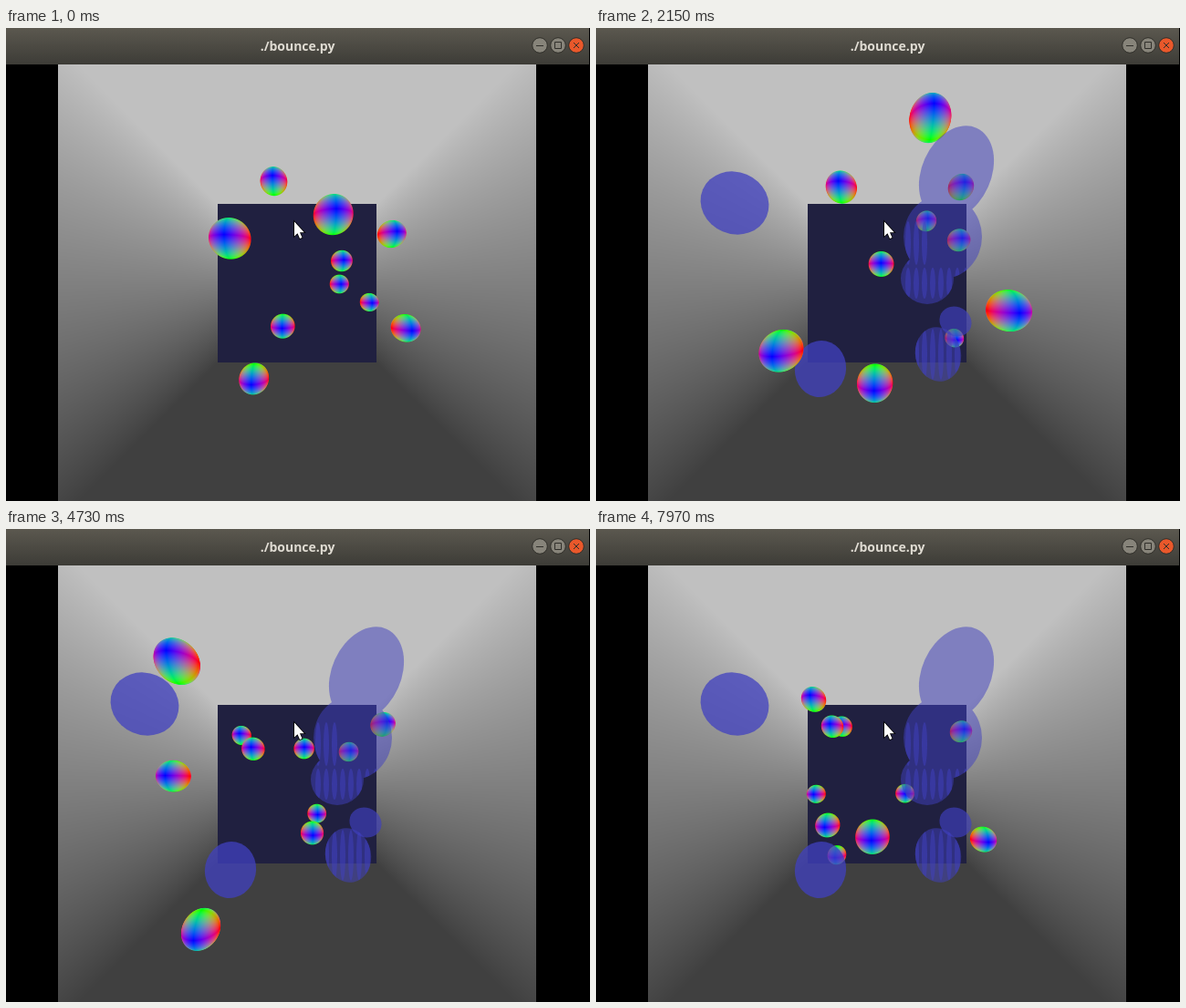
An HTML page with a canvas that plays this animation: 640x519 px, repeating every 8000 ms.

```html
<!DOCTYPE html>
<html lang="en">
<head>
<meta charset="utf-8">
<title>./bounce.py</title>
<style>
html, body { margin: 0; width: 100%; height: 100%; overflow: hidden; background: #000; }
canvas { display: block; }
</style>
</head>
<body>
<canvas id="stage" width="640" height="519"></canvas>
<script>
const LOOP = 8000;
const CX = 319, CY = 280, FOCAL = 262, RADIUS = 0.11;
const ctx = document.getElementById('stage').getContext('2d');

const clamp = (v, lo, hi) => Math.min(hi, Math.max(lo, v));

function makeCanvas(w, h) {
  const canvas = document.createElement('canvas');
  canvas.width = w;
  canvas.height = h;
  return canvas;
}

// ---- Room and window frame, painted once ----

function paintRoom(g) {
  const image = g.createImageData(640, 519);
  for (let y = 0, i = 0; y < 519; y++) {
    for (let x = 0; x < 640; x++, i += 4) {
      const u = Math.abs(x + 0.5 - CX), v = y + 0.5 - CY;
      let rgb = [0, 0, 0];
      if (Math.max(u, Math.abs(v)) < FOCAL / 3) rgb = [32, 32, 64];
      else if (u < FOCAL) rgb.fill(128 - 64 * clamp(v / u, -1, 1));
      image.data.set([...rgb, 255], i);
    }
  }
  g.putImageData(image, 0, 0);
}

function paintButton(g, x, color, glyph) {
  g.beginPath();
  g.arc(x, 19, 8.3, 0, 7);
  g.fillStyle = color;
  g.fill();
  g.strokeStyle = '#302f2a';
  g.lineWidth = 1;
  g.stroke();
  g.beginPath();
  glyph(x);
  g.stroke();
}

function paintTitleBar(g) {
  const shade = g.createLinearGradient(0, 0, 0, 40);
  shade.addColorStop(0, '#5b584f');
  shade.addColorStop(1, '#3d3c37');
  g.fillStyle = shade;
  g.fillRect(0, 0, 639, 40);
  g.fillStyle = '#dfdbd2';
  g.font = 'bold 14px "Open Sans", sans-serif';
  g.textAlign = 'center';
  g.fillText('./bounce.py', 319.5, 25);
  paintButton(g, 585, '#87847a', x => { g.moveTo(x - 4, 19.5); g.lineTo(x + 4, 19.5); });
  paintButton(g, 605, '#87847a', x => g.rect(x - 3.5, 15.5, 7, 7));
  paintButton(g, 625, '#e9582b', x => {
    g.moveTo(x - 3, 16); g.lineTo(x + 3, 22);
    g.moveTo(x + 3, 16); g.lineTo(x - 3, 22);
  });
}

const backdrop = makeCanvas(640, 519);
paintRoom(backdrop.getContext('2d'));
paintTitleBar(backdrop.getContext('2d'));

// ---- Balls: constant velocity, reflected by the walls of the room ----

const WALLS = [[-0.89, 0.89], [-0.89, 0.89], [1.18, 2.89]];
const balls = [];
const ball = (start, velocity) => balls.push({ start, velocity });

ball([-0.19, -0.83, 1.95], [0.386, 0.453, -0.398]);
ball([-0.36, -0.24, 1.29], [-0.508, -0.208, 0.198]);
ball([0.2, -0.38, 1.33], [0.21, -0.218, 0.365]);
ball([0.77, -0.4, 1.95], [-0.252, -0.22, -0.4]);
ball([0.46, -0.23, 2.47], [0.415, -0.208, 0.065]);
ball([0.49, 0.01, 2.78], [0.224, 0.302, 0.045]);
ball([0.87, 0.23, 2.88], [-0.428, -0.184, -0.375]);
ball([-0.13, 0.39, 2.17], [0.388, -0.378, 0.085]);
ball([0.87, 0.36, 1.92], [-0.439, 0.117, -0.21]);
ball([-0.32, 0.71, 1.78], [-0.114, -0.162, -0.23]);

function reflect(v, [lo, hi]) {
  const span = hi - lo, period = 2 * span;
  const u = ((v - lo) % period + period) % period;
  return lo + Math.min(u, period - u);
}

const positionAt = ({ start, velocity }, t) =>
  start.map((s, axis) => reflect(s + velocity[axis] * t / 1000, WALLS[axis]));

const SPRITE = 72;
const sprite = makeCanvas(SPRITE, SPRITE);
const spriteCtx = sprite.getContext('2d');
const pixels = spriteCtx.createImageData(SPRITE, SPRITE);

// Ray-cast sphere, coloured by the absolute value of its surface normal.
function drawBall([X, Y, Z]) {
  const left = Math.round(CX + X * FOCAL / Z) - SPRITE / 2;
  const top = Math.round(CY + Y * FOCAL / Z) - SPRITE / 2;
  const c = X * X + Y * Y + Z * Z - RADIUS * RADIUS;
  const edge = 2 * RADIUS * Z / FOCAL;
  const channel = n => 255 * Math.min(1, Math.abs(n) / RADIUS);
  pixels.data.fill(0);
  for (let py = 0, i = 0; py < SPRITE; py++) {
    for (let px = 0; px < SPRITE; px++, i += 4) {
      const dx = (left + px + 0.5 - CX) / FOCAL, dy = (top + py + 0.5 - CY) / FOCAL;
      const a = dx * dx + dy * dy + 1, b = dx * X + dy * Y + Z;
      const disc = b * b - a * c;
      const alpha = clamp(disc / edge + 0.5, 0, 1);
      if (!alpha) continue;
      const s = (b - Math.sqrt(Math.max(0, disc))) / a;
      pixels.data[i] = channel(dx * s - X);
      pixels.data[i + 1] = channel(dy * s - Y);
      pixels.data[i + 2] = channel(s - Z);
      pixels.data[i + 3] = 255 * alpha;
    }
  }
  spriteCtx.putImageData(pixels, 0, 0);
  ctx.drawImage(sprite, left, top);
}

// ---- Smooth blue surfaces ----

function addEllipse(path, x, y, rx, ry, turn = 0) {
  const part = new Path2D();
  part.ellipse(x, y, rx, ry, turn, 0, 2 * Math.PI);
  path.addPath(part);
  return path;
}

// Narrow teeth where the far layer shows through the near one.
const stripes = new Path2D();
for (let x = 342; x <= 415; x += 9) {
  if (x < 365) addEllipse(stripes, x, 236, 3, 24);
  addEllipse(stripes, x, 280, 3, 17);
  addEllipse(stripes, x, 358, 3, 28);
}

function blueBlob(z, alpha, path, striped) {
  return { z, draw() {
    ctx.fillStyle = `rgba(64,64,192,${alpha})`;
    ctx.fill(path);
    if (!striped) return;
    ctx.save();
    ctx.clip(path);
    ctx.fill(stripes);
    ctx.restore();
  } };
}

const oval = (...shape) => addEllipse(new Path2D(), ...shape);
const merged = oval(395, 159, 38, 54, 0.42);
addEllipse(merged, 380, 229, 43, 46);
addEllipse(merged, 363, 275, 29, 28);

const blueBlobs = [
  blueBlob(1.15, 0.75, oval(152, 192, 38, 34, 0.4)),
  blueBlob(1.2, 0.5, merged, true),
  blueBlob(2.4, 0.65, oval(394, 322, 18, 16, 0.5)),
  blueBlob(1.6, 0.5, oval(375, 358, 25, 30, -0.2), true),
  blueBlob(1.5, 0.75, oval(246, 374, 28, 31, 0.2)),
];

// ---- Blocky green surface: voxels around the balls, sliced by depth ----

const CELL = 0.05, WEIGHT = 0.0235, FROZEN_AT = 4730;

// Balls far to the right lie behind the blue surfaces, which hide their voxels.
function voxelSlices() {
  const centres = balls.map(b => positionAt(b, FROZEN_AT)).filter(([x]) => x < 0.5);
  const inside = (x, y, z) => centres.reduce((sum, [a, b, c]) =>
    sum + WEIGHT / ((x - a) ** 2 + (y - b) ** 2 + (z - c) ** 2), 0) > 1;
  const slices = [];
  for (let z = 3 - CELL / 2; z > 1; z -= CELL) {
    const path = new Path2D(), size = CELL * FOCAL / z;
    for (let x = -1 + CELL / 2; x < 1; x += CELL) {
      for (let y = -1 + CELL / 2; y < 1; y += CELL) {
        if (!inside(x, y, z)) continue;
        path.rect(CX + x * FOCAL / z - size / 2, CY + y * FOCAL / z - size / 2, size + 0.1, size + 0.1);
      }
    }
    slices.push({ z, draw() {
      ctx.fillStyle = 'rgba(64,192,64,0.5)';
      ctx.fill(path);
    } });
  }
  return slices;
}

const greenSlices = voxelSlices();

// ---- Overlays ----

const pointer = new Path2D('M316 212.5V228.5L319.5 225.2 322 231 324.5 230 322 224.2H326.8Z');

function drawPointer() {
  ctx.fillStyle = '#fff';
  ctx.strokeStyle = '#000';
  ctx.lineWidth = 1.6;
  ctx.stroke(pointer);
  ctx.fill(pointer);
}

function progressAt(t) {
  if (t >= 1580 && t < 1670) return 2 / 3;
  if (t >= 4910 && t < 5030) return 1 / 3;
  if (t >= 5030 && t < 5420) return 2 / 3;
  return 0;
}

// The picture freezes while surfaces are being computed.
const STALLS = [[730, 1580], [4730, 4910], [4910, 5030], [5030, 5210], [5210, 5420]];

function shownTime(t) {
  const stall = STALLS.find(([from, to]) => t >= from && t < to);
  return stall ? stall[0] : t;
}

function render(t) {
  const now = shownTime(t);
  const items = balls.map(b => {
    const p = positionAt(b, now);
    return { z: p[2], draw: () => drawBall(p) };
  });
  if (t >= 1670) items.push(...blueBlobs);
  if (t >= 5420 && t < 7450) items.push(...greenSlices);

  ctx.drawImage(backdrop, 0, 0);
  items.sort((a, b) => b.z - a.z).forEach(item => item.draw());
  ctx.fillStyle = '#ff4040';
  ctx.fillRect(0, 501, Math.floor(640 * progressAt(t)), 18);
  drawPointer();
}

const start = performance.now();
function tick() {
  render((performance.now() - start) % LOOP);
  requestAnimationFrame(tick);
}
tick();
</script>
</body>
</html>
```
